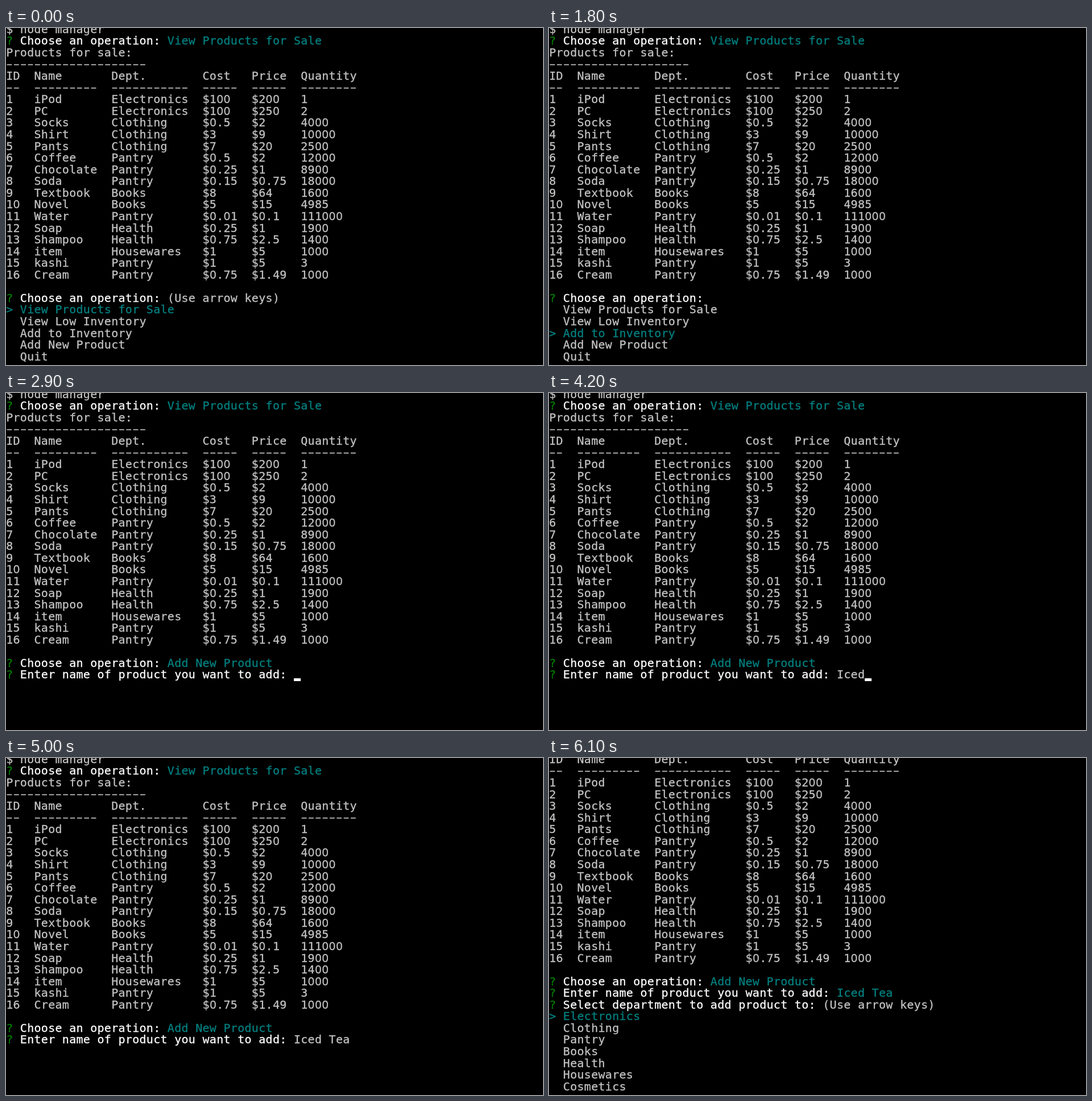
These frames come from a looping animation (944x593 px, 8000 ms). An HTML page with a canvas:

```html
<!DOCTYPE html>
<html lang="en">
<head>
<meta charset="utf-8">
<title>Store manager terminal</title>
<style>
  html, body { margin: 0; width: 100%; height: 100%; overflow: hidden; background: #000; }
  canvas { display: block; }
</style>
</head>
<body>
<canvas id="screen" width="944" height="593"></canvas>
<script>
const ctx = document.getElementById('screen').getContext('2d');
const LOOP = 8000, CELL_W = 12.335, ROW_H = 20.565, TOP = -7.1, BASELINE = 16;
const GRAY = '#c4c4c4', WHITE = '#fff', TEAL = '#008080', GREEN = '#008000';
const MONO = '20px "DejaVu Sans Mono", monospace';
const PLAIN_ZERO = '20px "Noto Sans", sans-serif';

const COLUMNS = [0, 4, 15, 28, 35, 42];
const TABLE = `ID|Name|Dept.|Cost|Price|Quantity
--|---------|-----------|-----|-----|--------
1|iPod|Electronics|$100|$200|1
2|PC|Electronics|$100|$250|2
3|Socks|Clothing|$0.5|$2|4000
4|Shirt|Clothing|$3|$9|10000
5|Pants|Clothing|$7|$20|2500
6|Coffee|Pantry|$0.5|$2|12000
7|Chocolate|Pantry|$0.25|$1|8900
8|Soda|Pantry|$0.15|$0.75|18000
9|Textbook|Books|$8|$64|1600
10|Novel|Books|$5|$15|4985
11|Water|Pantry|$0.01|$0.1|111000
12|Soap|Health|$0.25|$1|1900
13|Shampoo|Health|$0.75|$2.5|1400
14|item|Housewares|$1|$5|1000
15|kashi|Pantry|$1|$5|3
16|Cream|Pantry|$0.75|$1.49|1000`.split('\n').map(line => line.split('|'));
const OPERATIONS = ['View Products for Sale', 'View Low Inventory', 'Add to Inventory',
  'Add New Product', 'Quit'];
const DEPARTMENTS = ['Electronics', 'Clothing', 'Pantry', 'Books', 'Health', 'Housewares', 'Cosmetics'];
const CHOOSE = 'Choose an operation:', ENTER = 'Enter name of product you want to add:';
const HINT = '(Use arrow keys)', PRODUCT = 'Iced Tea';

// [start time, selected operation]
const SELECTIONS = [[0, 0], [500, 1], [1800, 2], [2200, 3]];
// [start time, typed letters, cursor visible]; -1 letters: the line is being redrawn
const TYPING = [
  [2900, 0, true], [3100, 0, false], [3600, 0, true], [3700, 1, true],
  [3900, 2, true], [4000, 3, true], [4100, 3, false], [4200, 4, true],
  [4400, 5, true], [4500, 6, true], [4600, -1, false], [4700, 7, true], [4800, 8, true],
  [5000, 8, false], [5500, 8, true], [6000, 8, false]
];
const latest = (steps, t) => steps.filter(step => step[0] <= t).pop();

let scroll = 0;
const rowTop = row => TOP + (row - scroll) * ROW_H;

function write(row, col, text, color = GRAY) {
  const top = rowTop(row);
  ctx.fillStyle = ctx.strokeStyle = color;
  [...text].forEach((char, i) => {
    const x = (col + i) * CELL_W;
    if (char === '-') {
      ctx.fillRect(x + 1.6, top + 9.1, 8.8, 1.7);
    } else {
      ctx.font = char === '0' ? PLAIN_ZERO : MONO;
      ctx.fillText(char, x + CELL_W / 2, top + BASELINE);
      ctx.strokeText(char, x + CELL_W / 2, top + BASELINE);
    }
  });
}

function prompt(row, question, answer = '', color = TEAL) {
  write(row, 0, '?', GREEN);
  write(row, 2, question, WHITE);
  write(row, question.length + 3, answer, color);
}

function menu(row, items, selected) {
  items.forEach((item, i) => {
    if (i === selected) write(row + i, 0, '>', TEAL);
    write(row + i, 2, item, i === selected ? TEAL : GRAY);
  });
}

function drawListing() {
  write(0, 0, '$ node manager');
  prompt(1, CHOOSE, OPERATIONS[0]);
  write(2, 0, 'Products for sale:');
  write(3, 0, '-'.repeat(20));
  TABLE.forEach((cells, r) => cells.forEach((cell, c) => write(4 + r, COLUMNS[c], cell)));
}

function drawTyping(t) {
  const [, count, cursor] = latest(TYPING, t);
  if (count < 0) return;
  prompt(24, ENTER, PRODUCT.slice(0, count), GRAY);
  if (cursor) {
    ctx.fillStyle = WHITE;
    ctx.fillRect(Math.round((ENTER.length + 3 + count) * CELL_W), Math.round(rowTop(24) + 15.5), 12, 5);
  }
}

function draw(t) {
  scroll = t >= 6100 ? 4 : 0;
  ctx.fillStyle = '#000';
  ctx.fillRect(0, 0, 944, 593);
  ctx.textAlign = 'center';
  ctx.lineWidth = 0.3;
  drawListing();
  if (t < 2900) {
    const selected = latest(SELECTIONS, t)[1];
    prompt(23, CHOOSE, t < 500 ? HINT : '', GRAY);
    menu(24, OPERATIONS, selected);
    return;
  }
  prompt(23, CHOOSE, OPERATIONS[3]);
  if (t < 6100) {
    drawTyping(t);
  } else {
    prompt(24, ENTER, PRODUCT);
    prompt(25, 'Select department to add product to:', HINT, GRAY);
    menu(26, DEPARTMENTS, 0);
  }
}

const start = performance.now();
function frame() {
  draw((performance.now() - start) % LOOP);
  requestAnimationFrame(frame);
}
frame();
</script>
</body>
</html>
```
